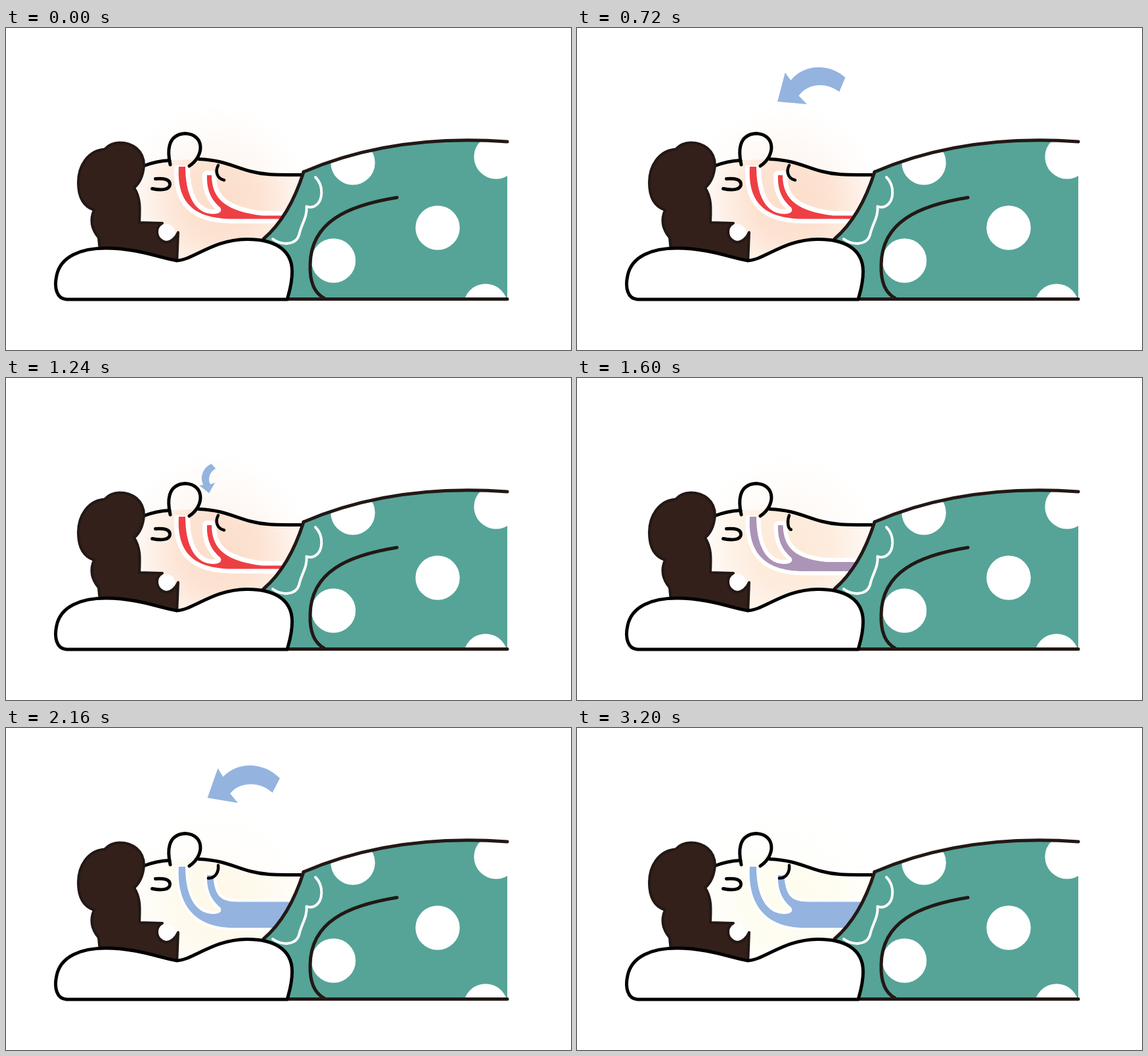
Recreate the animation shown at these times as an HTML page with a canvas. Size 860 by 490 pixels, loop 3.28 s.

```html
<!DOCTYPE html>
<html lang="en">
<head>
<meta charset="utf-8">
<title>Breathing during sleep</title>
<style>
html, body { margin: 0; width: 100%; height: 100%; overflow: hidden; background: #fff; }
canvas { display: block; width: 860px; height: 490px; }
</style>
</head>
<body>
<canvas id="stage" width="860" height="490"></canvas>
<script>
const ctx = document.getElementById('stage').getContext('2d');
const LOOP = 3280, STEP = 40, BREATH = 1500, BREATHS = 2;
const INK = '#231815', BLACK = '#000', WHITE = '#fff', TEAL = '#55a497', HAIR = '#33201a';
const RED = [238, 63, 68], BLUE = [148, 179, 223];
const PEACH = [252, 219, 198], IVORY = [254, 252, 237];

const clamp = v => Math.max(0, Math.min(1, v));
const ramp = (t, from, to) => clamp((t - from) / (to - from));
const mix = (a, b, k) => a + (b - a) * k;
const smooth = k => k * k * (3 - 2 * k);
const cubic = k => k < 0.5 ? 4 * k ** 3 : 1 - 4 * (1 - k) ** 3;
const blend = (a, b, k) => a.map((v, i) => Math.round(mix(v, b[i], k)));
const rgb = (c, alpha = 1) => `rgba(${c.join(',')},${alpha})`;

function fill(path, color) {
  ctx.fillStyle = color;
  ctx.fill(path);
}

function line(path, color, width = 5) {
  ctx.strokeStyle = color;
  ctx.lineWidth = width;
  ctx.stroke(path);
}

function disc(x, y, r) {
  ctx.fillStyle = WHITE;
  ctx.beginPath();
  ctx.arc(x, y, r, 0, 2 * Math.PI);
  ctx.fill();
}

const shapes = {
  nose: 'M250,208 C246,190 244,162 273,160.5 C302,162 303,194 279,210',
  brow: 'M209,210 C222,205 236,202 249,201.5',
  profile: 'M294,199.5 C330,201 346,211 372,218 C398,225 420,223 451,223.5',
  face: 'M200,213 C222,205 236,202 249,201.5 L294,199.5 C330,201 346,211 372,218' +
    ' C398,225 420,223 460,223.5 L400,360 L200,360 Z',
  eye: 'M227.5,229.5 C240,228.5 250,230 249.5,238.5 C248.5,247 235,247 222.5,244.5',
  hair: 'M210,209 C210,186 192,174.5 173,174.5 C163,174.5 156,178 150,184.5 C124,187 110,210 110,235' +
    ' C110,258 119,272 134,277 C127,293 131,307 141,319 L143,340 L200,350 L260,360 L262,311' +
    ' C258,320 251,326 244,326 C228,324 225,303 238,297 L203,296 C204,275 205,258 195,243 C206,234 209,221 210,209 Z',
  pillow: 'M92,413 C77,412 73,395 77,377 C83,347 115,335 152,335 C200,335 235,350 260,354' +
    ' C285,353 315,322 366,321.5 C405,321 435,335 435.5,370 C435.5,390 431,402 428,413 Z',
  body: 'M453,219 C530,186 630,164 763,173 L763,412 L400,412 L392,321 C420,297 440,260 453,219 Z',
  back: 'M453,219 C530,186 630,163.5 763,173',
  neckline: 'M453,219 C440,260 420,297 392,321',
  collar: 'M471,227 C484,240 483,264 470,271 Q464,274 457.5,271.5 C459,288 449,299 446,315 C441,331 419,331 406,321',
  arm: 'M595,258 C520,270 464,295 463,360 C462,390 471,404 484,411',
  ground: 'M92,412.5 L763,412.5',
  arrow: 'M307,107 L322,62 L330,75 C350,52 390,50 416,76 L405,98 C385,80 355,82 341,100 L353,114 Z'
};
for (const name in shapes) shapes[name] = new Path2D(shapes[name]);

const dots = [[528, 205], [746, 196], [657, 304], [498.5, 354], [730, 423]];

function glow(color, x, y, radius, strength) {
  const g = ctx.createRadialGradient(x, y, 0, x, y, radius);
  g.addColorStop(0, rgb(color, strength));
  g.addColorStop(0.4, rgb(color, strength * 0.8));
  g.addColorStop(0.75, rgb(color, strength * 0.32));
  g.addColorStop(1, rgb(color, 0));
  ctx.fillStyle = g;
  ctx.fillRect(x - radius, y - radius, 2 * radius, 2 * radius);
}

// Strong warmth inside the face, only a faint halo around it.
function drawGlow(t) {
  const k = ramp(t, 1350, 2600);
  const color = blend(PEACH, IVORY, 1 - (1 - k) ** 2);
  glow(color, 318, 262, 146, 0.3);
  ctx.save();
  ctx.clip(shapes.face);
  glow(color, 328, 262, 146, 0.9);
  ctx.restore();
}

function airway(k) {
  const low = mix(290.5, 304, k), high = mix(285.5, 264.5, k);
  const p = new Path2D();
  p.moveTo(263, 211);
  p.bezierCurveTo(260, 261, mix(281, 280, k), mix(291, 304, k), 347, low);
  p.lineTo(432, low);
  p.lineTo(432, high);
  p.lineTo(mix(390, 352, k), high);
  p.bezierCurveTo(mix(337, 325, k), mix(279, 264, k), mix(313, 318, k), mix(262, 255, k), mix(313, 315, k), 224);
  p.lineTo(306, 224);
  p.bezierCurveTo(305, 247, 313, 262, 326, 273);
  p.bezierCurveTo(331, 281, 321, 285, 307, 282);
  p.bezierCurveTo(286, 277, 273, 252, 273, 211);
  p.closePath();
  return p;
}

function drawAirway(t, open) {
  const p = airway(open);
  ctx.save();
  ctx.beginPath();
  ctx.rect(240, 209, 220, 120);
  ctx.clip();
  line(p, WHITE, mix(14, 8, open));
  fill(p, rgb(blend(RED, BLUE, ramp(t, 1380, 1680))));
  ctx.restore();
}

function drawFace(t) {
  const open = smooth(ramp(t, 1400, 2000));
  drawAirway(t, open);
  disc(244, 312, 13.5);
  for (const part of ['brow', 'nose', 'profile', 'eye']) line(shapes[part], BLACK);
  const mouth = new Path2D();
  mouth.moveTo(323, 209);
  mouth.bezierCurveTo(mix(318, 324, open), mix(218, 217, open),
    mix(321, 320, open), 229, mix(332, 308, open), mix(231.5, 228.5, open));
  line(mouth, BLACK, 4.5);
  fill(shapes.hair, HAIR);
  line(shapes.hair, INK, 4);
}

function drawBody() {
  fill(shapes.body, TEAL);
  ctx.save();
  ctx.clip(shapes.body);
  for (const [x, y] of dots) disc(x, y, 33.7);
  ctx.restore();
  line(shapes.collar, WHITE, 4);
  for (const part of ['neckline', 'back', 'arm', 'ground']) line(shapes[part], INK);
}

// The arrow swings down towards the mouth while shrinking.
function drawArrow(t) {
  if (t >= BREATH * BREATHS) return;
  const phase = t % BREATH;
  const alpha = ramp(phase, 120, 280) * (1 - ramp(phase, 1250, 1340));
  if (!alpha) return;
  const p = cubic(ramp(phase, 447, 1333));
  const size = 1.043 - 0.65 * p;
  ctx.save();
  ctx.globalAlpha = alpha;
  ctx.translate(366.2 - 89.2 * p + 33.1 * p * p, 88 + 32.2 * p + 33.2 * p * p);
  ctx.rotate((5 - 75 * p) * Math.PI / 180);
  ctx.scale(size, size);
  ctx.translate(-361, -90);
  fill(shapes.arrow, rgb(BLUE));
  ctx.restore();
}

function draw(t) {
  ctx.fillStyle = WHITE;
  ctx.fillRect(0, 0, 860, 490);
  ctx.lineCap = ctx.lineJoin = 'round';
  drawGlow(t);
  drawFace(t);
  drawBody();
  fill(shapes.pillow, WHITE);
  line(shapes.pillow, BLACK);
  drawArrow(t);
}

const start = performance.now();
function tick() {
  const t = (performance.now() - start) % LOOP;
  draw(Math.floor(t / STEP) * STEP);
  requestAnimationFrame(tick);
}
tick();
</script>
</body>
</html>
```
